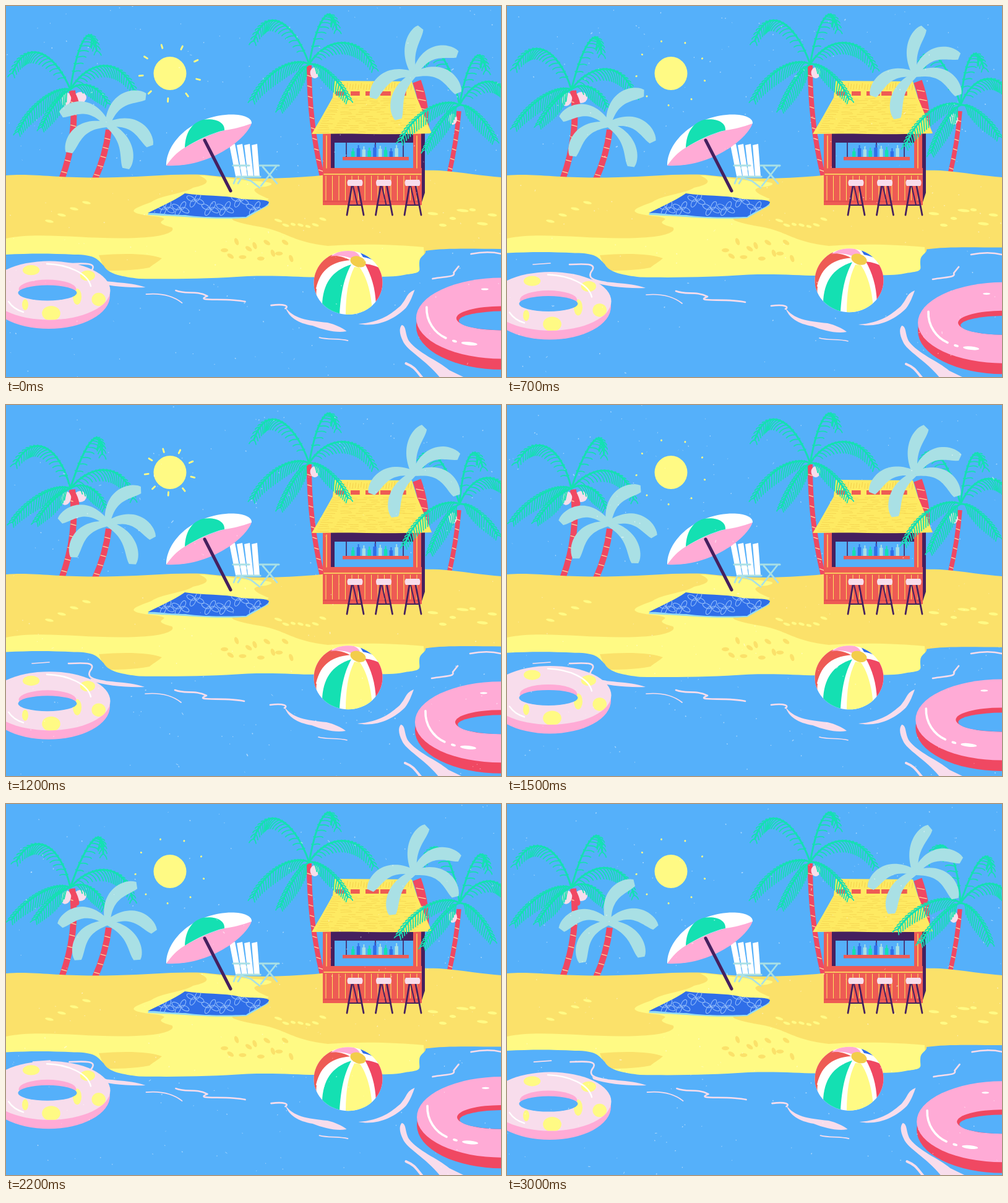
Animation of 800 by 600 pixels, one loop 3100 ms. Source, as an HTML page with a canvas:

```html
<!DOCTYPE html>
<html lang="en">
<head>
<meta charset="utf-8">
<title>Beach</title>
<style>
html, body { margin: 0; width: 100%; height: 100%; overflow: hidden; background: #55b0fa; }
canvas { display: block; width: 800px; height: 600px; }
</style>
</head>
<body>
<canvas id="stage" width="800" height="600"></canvas>
<script>
const ctx = document.getElementById('stage').getContext('2d');
const STEP = 100, STEPS = 31, TAU = Math.PI * 2;
const { sin, cos, abs, sqrt } = Math;
const rad = deg => deg * Math.PI / 180;
const C = {
  sky: '#55b0fa', sand: '#fbe16a', light: '#fffa84', green: '#14e0b2', teal: '#a9e0e5',
  red: '#f04862', hut: '#ee5b54', plum: '#45205f', pink: '#ffabd6', pale: '#f8ddec',
  blue: '#2f6ee8', straw: '#feea62', gold: '#f3cd4a', white: '#ffffff'
};

// Every moving part as a function of the step.
const swing = (n, period, peak = 0) => cos(TAU * (n - peak) / period);
const MOVE = {
  tealLeft: n => -21 * (n / 30) ** 0.92,
  tealRight: n => 10.5 * (n / 30) ** 0.92,
  greenLeft: n => 10.5 * sin(Math.PI * n / 39),
  greenRight: n => 2 - 7 * swing(n, 42, 9.5),
  ball: n => -3 * (1 - swing(n, 26)) - n / 15,
  bob: n => 10.7 * (1 - swing(n, 19.5)),
  tubeX: n => -1.5 + 2.2 * swing(n, 20, 4.5)
};

function random(seed) {
  return () => {
    seed = (seed + 0x6d2b79f5) | 0;
    let t = Math.imul(seed ^ (seed >>> 15), 1 | seed);
    t = (t + Math.imul(t ^ (t >>> 7), 61 | t)) ^ t;
    return ((t ^ (t >>> 14)) >>> 0) / 4294967296;
  };
}

const toPath = d => d instanceof Path2D ? d : new Path2D(d);
function fill(color, d) {
  ctx.fillStyle = color;
  ctx.fill(toPath(d));
}
function line(color, width, d) {
  ctx.strokeStyle = color;
  ctx.lineWidth = width;
  ctx.stroke(toPath(d));
}
function ellipse(x, y, rx, ry = rx, tilt = 0) {
  const path = new Path2D();
  path.ellipse(x, y, rx, ry, tilt, 0, TAU);
  return path;
}
const oval = (color, ...shape) => fill(color, ellipse(...shape));
function rect(color, x, y, w, h) {
  ctx.fillStyle = color;
  ctx.fillRect(x, y, w, h);
}
function shifted(x, y, draw) {
  ctx.save();
  ctx.translate(x, y);
  draw();
  ctx.restore();
}
function clipped(d, draw) {
  ctx.save();
  ctx.clip(toPath(d));
  draw();
  ctx.restore();
}

// Point and unit tangent on a Bezier curve of any degree.
function along(pts, t) {
  let p = pts, d = [0, 0];
  while (p.length > 1) {
    if (p.length === 2) d = [p[1][0] - p[0][0], p[1][1] - p[0][1]];
    p = p.slice(1).map((q, i) => [p[i][0] + (q[0] - p[i][0]) * t, p[i][1] + (q[1] - p[i][1]) * t]);
  }
  const l = Math.hypot(...d) || 1;
  return { x: p[0][0], y: p[0][1], tx: d[0] / l, ty: d[1] / l };
}

// Feathered frond: arched spine with hairs hanging from it.
function frond([angle, len]) {
  const a = rad(angle), x = cos(a) * len, y = sin(a) * len;
  const lift = len * (0.5 - 0.41 * sin(a));
  const pts = [[0, 0], [x * 0.3, y * 0.3 - lift], [x * 0.8, y * 0.8 - lift], [x, y]];
  const spine = new Path2D(), hairs = new Path2D();
  spine.moveTo(0, 0);
  spine.bezierCurveTo(...pts[1], ...pts[2], ...pts[3]);
  const count = Math.round(len / 4.8), under = x < 0 ? -1 : 1;
  for (let i = 2; i <= count; i++) {
    const t = i / count, p = along(pts, t);
    for (const side of [under, -under]) {
      const size = side === under ? 8 + 14 * sin(Math.PI * t ** 0.8) : 4 + 7 * Math.max(0, p.ty);
      const dx = p.tx * 0.5 - p.ty * side * 0.6, dy = p.ty * 0.5 + p.tx * side * 0.6;
      hairs.moveTo(p.x, p.y);
      hairs.quadraticCurveTo(p.x + dx * size * 0.7, p.y + dy * size * 0.5,
        p.x + dx * size, p.y + (dy + 0.3) * size);
    }
  }
  return { spine, hairs };
}

// Broad leaf: bends over its upper side, thin at the root, round at the tip.
function leaf(angle) {
  const a = rad(angle), x = cos(a) * 80, y = sin(a) * 80;
  const bend = (22 + 19 * abs(cos(a))) / 80 * (x < 0 ? -1 : 1);
  const pts = [[0, 0], [x / 2 + y * bend, y / 2 - x * bend], [x, y]];
  const left = [], right = [];
  for (let t = 0; t <= 1; t += 0.04) {
    const p = along(pts, t), w = (4 + 10.5 * t ** 0.8) * sqrt(1 - t ** 4);
    left.push([p.x - p.ty * w, p.y + p.tx * w]);
    right.unshift([p.x + p.ty * w, p.y - p.tx * w]);
  }
  const path = new Path2D();
  left.concat(right).forEach(q => path.lineTo(...q));
  path.closePath();
  return path;
}

// Fronds as angle and length, leaves as angles only.
const GREEN_LEFT = [[196, 97], [-56, 76], [0, 102], [141, 108], [20, 63], [127, 76]].map(frond);
const GREEN_MID = [[203, 97], [-52, 72], [3, 104], [148, 107], [42, 84], [123, 85]].map(frond);
const GREEN_RIGHT = [[148, 110], [-54, 71], [-7, 80], [44, 79], [126, 90], [223, 86]].map(frond);
const TEAL_LEFT = [-34, 29, 69, 190, 142].map(leaf);
const TEAL_RIGHT = [-81, -23, 25, 108, 148].map(leaf);

function crown(x, y, turn, draw) {
  shifted(x, y, () => {
    ctx.rotate(rad(turn));
    draw();
  });
}
const fronds = (x, y, turn, list) => crown(x, y, turn, () => list.forEach(f => {
  line(C.green, 3, f.spine);
  line(C.green, 1.8, f.hairs);
}));
const leaves = (x, y, turn, list) => crown(x, y, turn, () => list.forEach(p => fill(C.teal, p)));

// Trunk from top to foot, bowed sideways in the middle.
function trunk(x0, y0, x1, y1, bow, width, rings) {
  const mid = [(x0 + x1) / 2 + bow, (y0 + y1) / 2];
  ctx.lineCap = 'butt';
  line(C.red, width, `M${x0} ${y0}Q${mid} ${x1} ${y1}`);
  for (let i = 1; i <= rings; i++) {
    const p = along([[x0, y0], mid, [x1, y1]], i / (rings + 0.6)), w = width * 0.45;
    line('#ffd9a0', 1.3, `M${p.x - w} ${p.y - 1}L${p.x + w} ${p.y + 1.5}`);
  }
  ctx.lineCap = 'round';
}

function sun(n) {
  oval(C.light, 265, 109, 26.5, 27);
  const phase = n % 8;
  for (let i = 0; i < 9; i++) {
    const a = rad(14 + 40 * i), far = phase > 5 ? 56 : phase < 3 ? 44 : 35;
    const at = r => `${265 + cos(a) * r} ${108 + sin(a) * r * 0.94}`;
    line(C.light, 2.8, `M${at(far)}L${at(far + (phase > 5 ? 0.4 : 6))}`);
  }
}

function sand() {
  fill(C.sand, 'M0 274C50 270 80 280 180 277C230 276 270 271 320 273C390 281 440 280 500 275C560 267 640 264 700 266C740 269 770 275 800 277V470H0Z');
  fill(C.light, 'M312 274C335 274 360 280 400 283C425 284 440 287 420 292C390 294 400 302 425 312L388 341C340 342 380 352 410 357C455 365 460 381 520 388C580 384 630 386 675 390L680 470H0V376C60 363 150 382 238 373C255 371 275 365 268 358C225 347 280 346 240 340C180 334 215 325 235 317C250 306 290 303 302 294C330 288 330 282 312 274Z');
  fill(C.sand, 'M150 403C195 399 235 401 252 408C244 415 236 419 232 423C205 428 180 428 160 428Z');
  for (let i = 0; i < 12; i++) {
    oval(C.sand, 353 + i * 9.8, 395 + 14 * sin(i * 2.4), 6, 3.2, i % 3 * 0.6);
  }
  const rnd = random(8);
  for (let i = 0; i < 7; i++) {
    oval(C.light, 440 + i * 12, 344 + rnd() * 18, 4 + rnd() * 4, 2.2, 0.3);
    oval(C.light, 690 + i * 16, 325 + rnd() * 36, 5 + rnd() * 5, 2.4, 0.1);
  }
  for (let i = 0; i < 4; i++) oval(C.light, 70 + i * 20, 348 - i * 10, 7, 2.2, 0.2);
}

function water(dy) {
  shifted(0, dy, () => fill(C.sky,
    'M0 402C40 400 70 400 110 402C145 402 148 410 158 420C165 434 190 438 215 441C280 442 330 441 390 437C450 435 480 440 520 438C570 436 620 441 648 434C675 431 667 428 668 415C668 404 680 402 678 396C710 391 760 393 800 393V610H0Z'));
}

function waves(shift) {
  shifted(shift, -shift * 0.6, () => {
    line(C.pale, 1.7, 'M42 418L70 416M225 467C248 465 268 469 283 481M505 537C520 541 535 538 551 542');
    line(C.pale, 2.6, 'M101 418C126 417 144 416 138 427C128 440 140 444 160 447M273 461C290 468 305 460 324 470C300 480 355 472 385 479M427 485C450 482 456 487 450 490M688 442C706 438 726 440 722 432L730 422M750 402C770 398 788 399 800 402');
    fill(C.pale, 'M136 442C160 449 195 446 224 456C195 457 160 454 138 446Z');
    fill(C.pale, 'M450 488C462 506 485 510 518 513C530 516 542 521 549 527C532 530 512 525 494 518C470 514 455 504 450 488Z');
    fill(C.pale, 'M568 515C604 513 622 498 636 486C648 472 645 466 659 460C656 468 652 480 645 489C626 508 598 521 568 515Z');
    fill(C.pale, 'M638 517C646 518 643 532 650 543C664 562 696 574 715 590L740 602H700C678 574 646 558 640 543C635 533 633 523 638 517Z');
    line(C.pale, 4, 'M645 579C660 585 662 592 672 603');
  });
}

function chair() {
  line(C.teal, 2.8, 'M378 262L368 287M391 260L375 287M373 275L396 283L410 294M415 260L438 287M437 259L412 291');
  for (let i = 0; i < 4; i++) {
    const x = 361 + i * 12, b = 371 + i * 10;
    fill(C.white, `M${x} 225L${x + 9} 223L${b + 9} 275H${b}Z`);
  }
  line(C.teal, 3.2, 'M367 258H393M410 258H441M374 276H411');
}

function umbrella() {
  fill(C.pink, 'M259 258C268 228 345 200 397 189C390 214 330 262 259 258Z');
  fill(C.white, 'M259 258C259 222 298 181 355 176C380 174 398 180 397 190C380 196 368 199 353 201C330 207 310 217 289 229C274 238 268 246 259 258Z');
  fill(C.green, 'M289 229C290 205 300 189 318 184C340 181 354 189 353 201C333 205 308 217 289 229Z');
  line(C.plum, 5, 'M321 217L363 299');
}

function towel() {
  fill('#93dcf2', 'M231 334L229 338C290 340 330 346 388 343L425 322L420 316Z');
  const cloth = new Path2D('M289 303C320 308 350 305 380 312C400 314 420 312 425 317C424 325 402 330 388 341C340 342 320 342 290 338C260 338 245 334 229 335C250 324 270 316 289 303Z');
  fill(C.blue, cloth);
  clipped(cloth, () => {
    for (let i = 0; i < 7; i++) {
      const x = 258 + i * 24, y = 323 + 9 * sin(i * 2.1 + 0.5);
      for (let a = 0.5; a < TAU; a += TAU / 4) {
        line('#93bdf9', 1.1, ellipse(x + cos(a) * 8.5, y + sin(a) * 5.5, 7, 3.6, a));
      }
    }
  });
}

function stool(x) {
  line(C.plum, 2.8, `M${x - 5} 291L${x - 13} 338M${x + 5} 291L${x + 14} 338`);
  line(C.plum, 2, `M${x - 3} 291L${x + 4} 322M${x - 11} 322H${x + 11}`);
  fill(C.pale, `M${x - 11} 281H${x + 11}Q${x + 14} 286 ${x + 11} 291H${x - 11}Q${x - 14} 286 ${x - 11} 281Z`);
}

function roof() {
  const rnd = random(5);
  fill(C.straw, 'M531 121L656 122L664 148L688 206C620 209 560 205 494 207L510 180L528 148Z');
  for (let x = 534; x < 656; x += 4.5) line(C.gold, 0.9, `M${x} ${124 + rnd() * 4}l-1 8`);
  for (let x = 533; x < 650; x += 24) rect(C.hut, x, 138, 14 + rnd() * 9, 7);
  for (let y = 150; y < 204; y += 3.6) {
    const open = (y - 148) * 0.5;
    for (let x = 530 - open; x < 650 + open * 0.6; x += 16 + rnd() * 24) {
      line('#f5d552', 0.9, `M${x} ${y}q8 ${rnd() * 3 - 1.5} ${10 + rnd() * 10} ${rnd() * 2 - 1}`);
    }
  }
}

function bottles() {
  const tints = [C.green, C.blue, C.teal];
  for (let i = 0; i < 9; i++) {
    const x = 558 + i * 8.8, h = 9 + (i * 5) % 7;
    rect(tints[i % 3], x, 244 - h, 5.5, h);
    rect(tints[i % 3], x + 1.8, 239 - h, 2, 6);
  }
}

function hut() {
  fill(C.plum, 'M660 205H677V302L671 320H660Z');
  rect(C.plum, 524, 205, 136, 58);
  rect(C.sky, 531, 221, 127, 41);
  line(C.plum, 1.6, 'M550 220V245M597 220V245M642 220V245');
  bottles();
  rect(C.hut, 544, 244, 107, 5.5);
  rect(C.hut, 512, 205, 13, 60);
  rect(C.hut, 658, 205, 13, 60);
  rect(C.hut, 512, 262, 160, 60);
  line(C.straw, 1.3, 'M514 272H671M518 210V262M664 210V262');
  for (let x = 517; x < 672; x += 10.5) line(C.straw, 1, `M${x} 275V314`);
  line('#d9404a', 1.2, 'M513 316H671');
  roof();
  for (let i = 0; i < 3; i++) stool(564 + i * 46.5);
}

function ball(dy) {
  shifted(0, dy, () => {
    clipped(ellipse(553, 447.5, 55.5, 51.5), () => {
      rect(C.white, 490, 390, 125, 115);
      fill(C.hut, 'M556 411C522 414 506 430 500 462L490 440L515 400C530 404 545 404 556 411Z');
      fill(C.pink, 'M524 405C535 403 548 404 558 408L572 405C568 398 560 394 545 393Z');
      fill(C.blue, 'M572 398L577 406C590 408 600 414 608 420L596 394Z');
      fill(C.green, 'M558 418C526 428 512 450 511 484C520 494 530 500 539 500C541 465 546 440 558 418Z');
      fill(C.light, 'M563 422C552 444 549 470 549 502H592C592 470 584 440 572 423Z');
      fill(C.red, 'M580 417C590 435 597 455 598 484L614 465V430C603 422 592 418 580 417Z');
      fill(C.hut, 'M502 458C500 470 504 478 506 484L495 470V450Z');
    });
    oval(C.gold, 569, 413.5, 13, 8.5, 0.35);
  });
}

function spottedRing(dy) {
  shifted(0, dy, () => {
    const top = ellipse(70, 460, 98.5, 47.5);
    oval(C.pink, 69, 468.5, 99, 53.5);
    fill(C.pale, top);
    clipped(top, () => {
      for (let i = 0; i < 4; i++) {
        const a = rad(250 + 66 * i);
        oval(C.light, 70 + 86 * cos(a), 461 + 36 * sin(a), 15 - 4 * abs(cos(a)), 10 + 2 * sin(a));
      }
      oval(C.light, 31, 483, 5, 9);
      oval(C.light, 115, 470, 7, 13);
    });
    oval(C.pink, 67, 458, 46.5, 15.5);
    oval(C.sky, 67, 464, 47.5, 12.5);
    line(C.white, 2.4, 'M66 417C100 418 132 432 137 453M4 478C10 487 18 492 28 495');
  });
}

function pinkRing(dx, dy) {
  shifted(dx, dy, () => {
    oval(C.red, 803, 518, 139, 70);
    oval(C.pink, 803, 505, 139, 65.5);
    oval(C.red, 802, 505, 73, 19.5);
    oval(C.sky, 806, 509, 73, 15.5);
    line(C.white, 3.6, 'M681 487C680 510 694 529 712 537');
    oval(C.white, 726, 542, 4, 2, 0.3);
    oval(C.white, 750, 546, 13, 2.8, 0.1);
    oval(C.white, 775, 458, 6, 1.6);
  });
}

function speckles(seed) {
  const rnd = random(seed * 97 + 11);
  ctx.globalAlpha = 0.5;
  for (let i = 0; i < 220; i++) {
    const tail = i % 16 ? 1.2 : 6;
    line(C.white, 0.7 + rnd(), `M${rnd() * 800} ${rnd() * 600}l${(rnd() - 0.5) * tail} ${(rnd() - 0.5) * tail}`);
  }
  ctx.globalAlpha = 1;
}

function scene(n) {
  const at = name => MOVE[name](n), bob = at('bob');
  ctx.lineCap = ctx.lineJoin = 'round';
  rect(C.sky, 0, 0, 800, 600);
  sun(n);

  trunk(107, 137, 90, 280, 18, 10, 7);
  trunk(166, 200, 143, 282, 7, 10, 5);
  trunk(490, 96, 511, 276, -11, 8, 10);
  trunk(664, 122, 676, 205, 9, 14, 5);
  trunk(732, 170, 716, 272, 4, 7.5, 6);
  sand();

  oval(C.pale, 97, 151, 8, 11, 0.3);
  oval(C.pale, 120, 148, 10, 9);
  line(C.red, 9, 'M107 141C111 148 113 153 114 160');
  fronds(104, 135, at('greenLeft'), GREEN_LEFT);
  leaves(164, 192, at('tealLeft'), TEAL_LEFT);

  oval(C.pale, 499, 108, 7.5, 9);
  hut();
  fronds(490, 94, 0, GREEN_MID);
  oval(C.pale, 722, 183, 7, 9);
  fronds(733, 160, at('greenRight'), GREEN_RIGHT);
  leaves(660, 111, at('tealRight'), TEAL_RIGHT);

  chair();
  towel();
  umbrella();
  water(-bob * 0.14);
  waves(n % 11 === 0 || n % 11 > 7 ? 1.5 : 0);
  ball(at('ball'));
  spottedRing(bob);
  pinkRing(at('tubeX'), bob * 0.42);
  speckles(Math.floor(n / 5));
}

const start = performance.now();
let shown = -1;
function tick() {
  const n = Math.floor((performance.now() - start) / STEP) % STEPS;
  if (n !== shown) scene(shown = n);
  requestAnimationFrame(tick);
}
tick();
</script>
</body>
</html>
```
